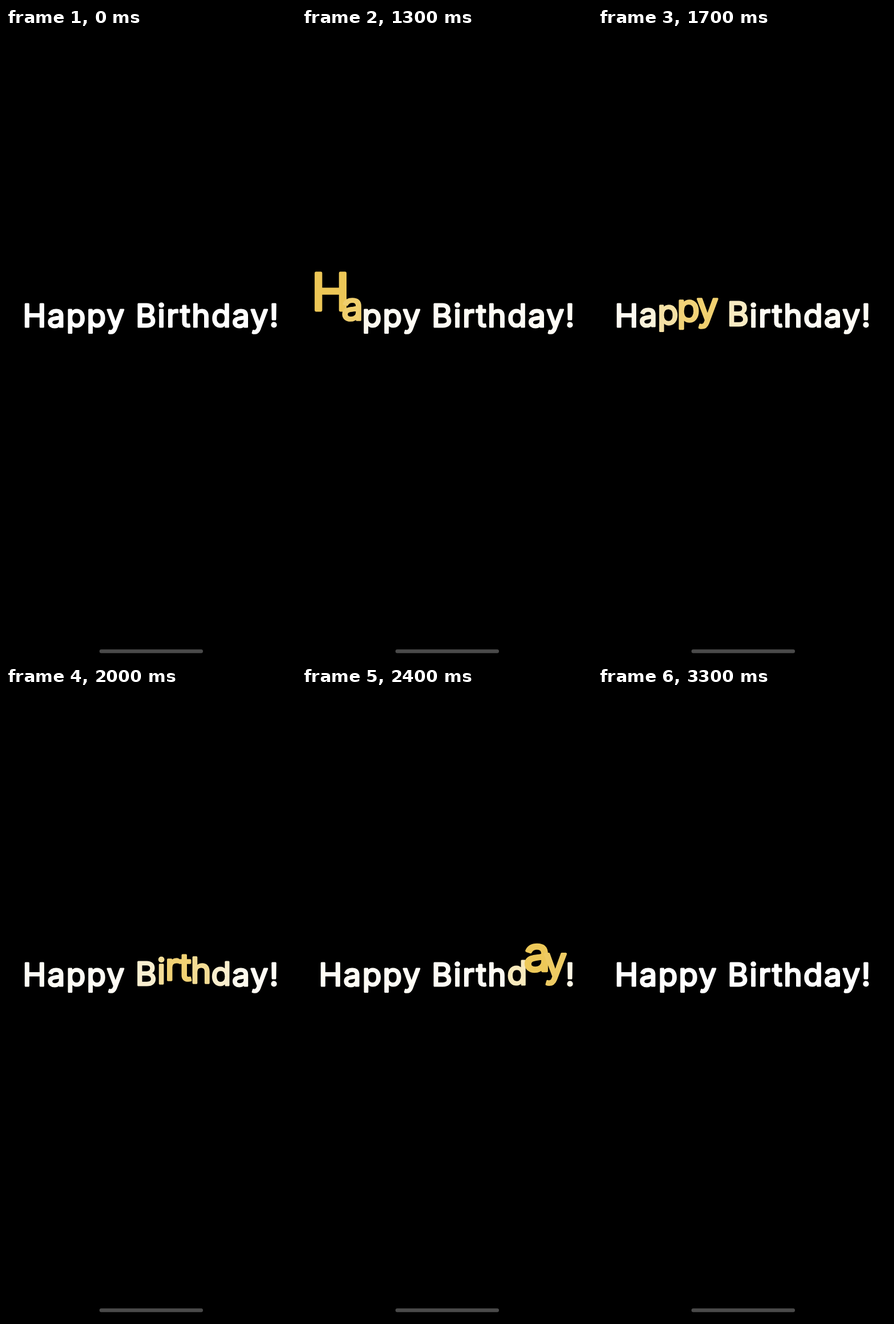
An HTML page with a canvas for the animation above (3.4 s loop, 508 by 1102 pixels).

```html
<!DOCTYPE html>
<html lang="en">
<head>
<meta charset="utf-8">
<title>Happy Birthday!</title>
<style>
  html, body { margin: 0; height: 100%; overflow: hidden; background: #000; }
  canvas { display: block; }
</style>
</head>
<body>
<canvas id="stage" width="508" height="1102" aria-label="Happy Birthday!"></canvas>
<script>
const ctx = document.getElementById('stage').getContext('2d');
const LOOP = 3400, STEP = 100;
const TEXT = 'Happy Birthday!';
const LEFT = 32, RIGHT = 475, BOTTOM = 524;
const CAP = 43, STEM = 8.5;
const WHITE = [255, 255, 255], GOLD = [237, 199, 86];
const LAST_CREST = 12.5;

const clamp = v => Math.max(0, Math.min(1, v));
const mix = (a, b, m) => a + (b - a) * m;
const smoother = p => p * p * p * (p * (6 * p - 15) + 10);
const setFont = size => { ctx.font = `400 ${size}px Inter, sans-serif`; };
const inkWidth = box => box.actualBoundingBoxRight + box.actualBoundingBoxLeft;

// A regular face with a round outline gives soft corners and the right weight.
setFont(100);
const cap = ctx.measureText('H').actualBoundingBoxAscent / 100;
const stem = inkWidth(ctx.measureText('l')) / 100;
const fontSize = (CAP - STEM) / (cap - stem);
const outline = STEM - stem * fontSize;
const baseline = BOTTOM - outline / 2;

// One even tracking value lets the outlined line span the margins.
setFont(fontSize);
const line = ctx.measureText(TEXT);
const tracking = (RIGHT - LEFT - outline - inkWidth(line)) / (TEXT.length - 1);
const origin = LEFT + outline / 2 + line.actualBoundingBoxLeft;

const letters = [...TEXT].map((char, index) => {
  const box = ctx.measureText(char);
  const pen = ctx.measureText(TEXT.slice(0, index + 1)).width - box.width;
  return {
    char, index,
    x: origin + pen + tracking * index,
    inkX: (box.actualBoundingBoxRight - box.actualBoundingBoxLeft) / 2,
    inkY: (box.actualBoundingBoxDescent - box.actualBoundingBoxAscent) / 2
  };
});

// The wave eases along the line; it is wide and low while it moves fast.
function waveAt(t) {
  const p = clamp((t - 1142) / 1430);
  const width = .8 + 1.2 * Math.sin(Math.PI * p) ** 3;
  const fade = clamp((t - 970) / 330) * clamp((2950 - t) / 600);
  return {
    crest: LAST_CREST * smoother(p),
    width,
    height: .52 * fade / width ** 1.4
  };
}

function drawLetter({ char, x, inkX, inkY }, lift, glow) {
  const tint = glow * (.06 + .94 * (1 - Math.exp(-8 * lift)));
  ctx.fillStyle = ctx.strokeStyle =
    `rgb(${WHITE.map((c, i) => Math.round(mix(c, GOLD[i], tint)))})`;
  ctx.save();
  ctx.translate(x + inkX, baseline + inkY - 66 * lift);
  ctx.scale(1 + lift, 1 + lift);
  ctx.fillText(char, -inkX, -inkY);
  ctx.strokeText(char, -inkX, -inkY);
  ctx.restore();
}

function draw(t) {
  ctx.fillStyle = '#000';
  ctx.fillRect(0, 0, 508, 1102);

  ctx.fillStyle = '#4a4a4a';
  ctx.beginPath();
  ctx.roundRect(163.7, 1085.2, 181.3, 6.5, 3.25);
  ctx.fill();

  setFont(fontSize);
  ctx.lineWidth = outline;
  ctx.lineJoin = ctx.lineCap = 'round';
  const { crest, width, height } = waveAt(t);
  const glow = clamp((t - 900) / 300) * clamp((3200 - t) / 300);
  for (const letter of letters) {
    const distance = (letter.index - crest) / width;
    drawLetter(letter, height * Math.exp(-distance * distance), glow);
  }
}

const start = performance.now();
function tick() {
  const t = (performance.now() - start) % LOOP;
  draw(Math.floor(t / STEP) * STEP);
  requestAnimationFrame(tick);
}
tick();
</script>
</body>
</html>
```
